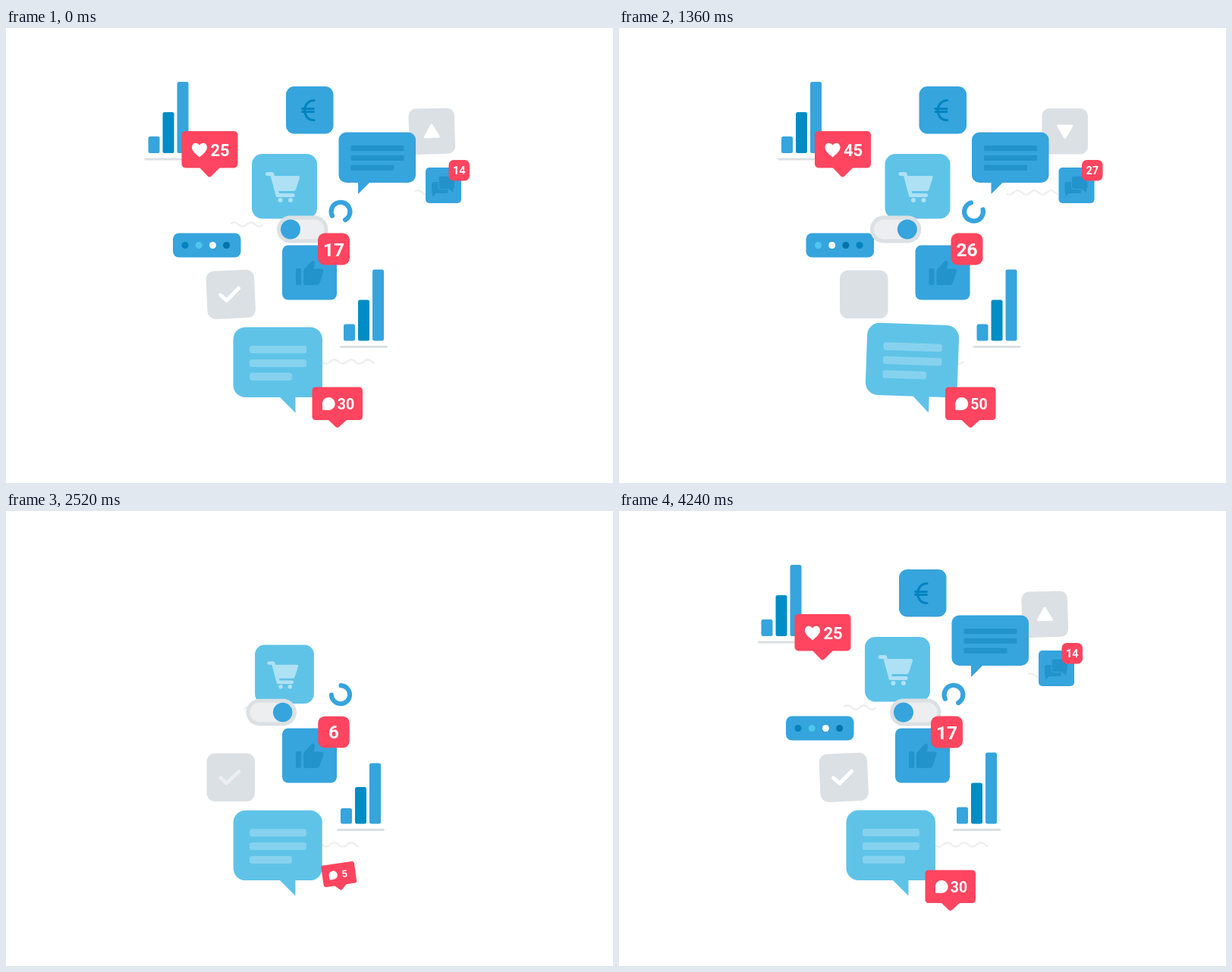
An HTML page with a canvas for the animation above (4.28 s loop, 800 by 600 pixels).

```html
<!DOCTYPE html>
<html>
<head>
<meta charset="utf-8">
<style>
html, body { margin: 0; width: 100%; height: 100%; overflow: hidden; background: #fff }
canvas { display: block }
</style>
</head>
<body>
<canvas id="stage" width="800" height="600"></canvas>
<script>
const c = document.getElementById('stage').getContext('2d');
const LOOP = 4280, BLUE = '#36a4dd', DARK = '#008cc4', ICON = '#2293cb', LIGHT = '#5fc3e8',
  RED = '#ff455f', GRAY = '#dbe0e4', WAVE = '#eeeff1', WHITE = '#fff';
const DOTS = [[0, 116, 173], [4, 131, 191], [79, 198, 236], [255, 255, 255]];

// Eased value through a few [time, value] points
function key(u, pts, linear) {
  if (u <= pts[0][0]) return pts[0][1];
  for (let i = 1; i < pts.length; i++) {
    const [t0, a] = pts[i - 1], [t1, b] = pts[i];
    if (u < t1) {
      const p = (u - t0) / (t1 - t0);
      return a + (b - a) * (linear ? p : (1 - Math.cos(Math.PI * p)) / 2);
    }
  }
  return pts[pts.length - 1][1];
}

// Exponential ease out, 0 before the start
function rise(u, start, dur = 800) {
  const p = (u - start) / dur;
  return p <= 0 ? 0 : p >= 1 ? 1 : 1 - 2 ** (-10 * p);
}

// Draws around (x, y) with a scale and a turn in degrees
function at(x, y, scale, turn, draw) {
  if (scale <= 0) return;
  c.save();
  c.translate(x, y);
  c.rotate(turn * Math.PI / 180);
  c.scale(scale, scale);
  c.translate(-x, -y);
  draw();
  c.restore();
}

// Brings a part in: grows from (x+dx, y+dy), turned, to its place
function pop(e, x, y, dx, dy, turn, draw) {
  c.save();
  c.translate(dx * (1 - e), dy * (1 - e));
  at(x, y, e, turn * (1 - e), draw);
  c.restore();
}

function box(x, y, w, h, r, color) {
  c.fillStyle = color;
  c.beginPath();
  c.roundRect(x, y, w, h, r);
  c.fill();
}
function disc(x, y, r, color) {
  c.fillStyle = color;
  c.beginPath();
  c.arc(x, y, r, 0, 7);
  c.fill();
}
function fill(d, color) {
  c.fillStyle = color;
  c.fill(new Path2D(d));
}
function line(d, color, width) {
  c.strokeStyle = color;
  c.lineWidth = width;
  c.lineCap = c.lineJoin = 'round';
  c.stroke(new Path2D(d));
}
function count(n, x, y, size) {
  c.fillStyle = WHITE;
  c.font = `700 ${size}px Roboto, sans-serif`;
  c.textAlign = 'center';
  c.fillText(Math.max(0, Math.floor(n)), x, y);
}

// Visible part of a fixed wavy line between a and b
function wave(a, b, y) {
  if (b - a < 2) return;
  let d = '';
  for (let x = a; x <= b; x++) d += (d ? 'L' : 'M') + x + ' ' + (y - 2.7 * Math.sin((x - 418) * Math.PI / 11 + 3.6));
  line(d, WAVE, 2.5);
}
const cycle = (u, start, period) => ((u - start) % period + period) % period * .22;

function waves(u) {
  if (u < 2150) return;
  const left = 365 - cycle(u, 2288, 1530);
  wave(Math.max(297, left), Math.min(365, left + 66), 259);
  const low = 351 + cycle(u, 2006, 1625);
  wave(Math.max(351, low - 67), Math.min(485, low), 440);
  if (u < 3150) return;
  const high = 367 + cycle(u, 3153, 1610);
  wave(Math.max(367, high - 66), Math.min(577, high), 217);
}

function bars(u, start, x, y, dx) {
  const e = rise(u, start, 1000);
  if (!e) return;
  x += dx * (1 - e);
  [22, 54, 94].forEach((h, i) => {
    h *= rise(u, start + 58 * i, 1000);
    if (h > 1) box(x + 19 * i, y - h, 15, h, 2.5, i == 1 ? DARK : BLUE);
  });
  const mid = x + 26.5, half = 30 * Math.min(1, e * 1.07);
  line(`M${mid - half} ${y + 8}H${mid + half}`, GRAY, 3);
}

function euro() {
  box(369, 77, 62.5, 62.5, 11, BLUE);
}
function euroSign() {
  line('M406 95.5Q400 95.5 396.500 100Q393.500 104 393.500 108.500T396.500 117.500Q400 121.500 406 121.500', '#0084c0', 3.2);
  line('M390.500 106.500H405.500M390.500 110.500H405.500', '#0084c0', 2.8);
}

function triangle(u) {
  const turn = key(u, [[3490, 180], [4290, 360], [4600, 360], [5400, 540]]);
  at(561.2, 136.2, rise(u, 2850, 700), turn, () => {
    box(531, 106, 60.5, 60.5, 10, GRAY);
    const d = 'M561.2 128L570.2 143.500H552.2Z';
    fill(d, WHITE);
    line(d, WHITE, 3);
  });
}

function talk(u) {
  const e = rise(u, 2525);
  pop(e, 465, 218, 0, 0, 10, () => {
    box(438.5, 137.5, 101.5, 66.5, 10, BLUE);
    fill('M464 202V219L480 203Z', BLUE);
    [70, 70, 57].forEach((w, i) => box(454.5, 155 + 12.8 * i, w * rise(u, 2640 + 60 * i), 7.2, 1.5, ICON));
  });
}

function chat(u) {
  pop(rise(u, 3050), 576.5, 207.5, -30, 30, 0, () => {
    box(553, 184, 47, 47, 5, BLUE);
    box(561, 203, 22, 15, 3, ICON);
    fill('M562 216V222.500L568 217Z', ICON);
    c.beginPath();
    c.roundRect(570.5, 195.5, 20.5, 16.5, 3);
    c.strokeStyle = BLUE;
    c.lineWidth = 2;
    c.stroke();
    box(570.5, 195.5, 20.5, 16.5, 3, ICON);
    fill('M582 211L589.500 217V210Z', ICON);
  });
  pop(rise(u, 3150), 597, 187.5, -25, 25, 0, () => {
    box(583.5, 174, 27.5, 27.5, 6.5, RED);
    count(6.8 + .0099 * (u - 3480), 597.2, 193, 14.5);
  });
}

function hearts(u) {
  pop(rise(u, 3020), 268, 160, 65, 80, 60, () => {
    box(231.5, 136, 74, 48.5, 5, RED);
    fill('M254 183L266 195.500Q268.300 197.500 270.500 195.500L283 183Z', RED);
    fill('M255 170.500C250 166 245 162.500 245 157.500C245 151 252 150 255 154.500C258 150 265 151 265 157.500C265 162.500 260 166 255 170.500Z', WHITE);
    count(14.2 + .0149 * (u - 3480), 282, 169, 22);
  });
}

function cart(u) {
  pop(rise(u, 2248), 367, 209, 0, 68, 0, () => {
    box(324, 166, 86, 85.5, 14, LIGHT);
    const tint = '#aee1f4';
    line('M344.500 192.500H350.500L358 220.500H378', tint, 5);
    fill('M352 195H385Q387.600 195 387 197.500L382 213Q381.300 215 379 215H357Z', tint);
    disc(361.5, 227, 3, tint);
    disc(375, 227, 3, tint);
  });
}

function ring(u) {
  const gap = key(u, [[1700, -83], [2520, 225], [3480, 592], [4240, 827], [5280, 1268], [5600, 1380], [5960, 1515]], true);
  at(441, 242.2, rise(u, 2100), gap, () => {
    c.beginPath();
    c.arc(441, 242.2, 12.4, .82, Math.PI * 2 - .82);
    c.strokeStyle = BLUE;
    c.lineWidth = 6.2;
    c.lineCap = 'round';
    c.stroke();
  });
}

function password(u) {
  const step = key(u, [[2720, -3], [3480, 0], [4240, 3], [5280, 5], [5600, 6], [5960, 7]], true);
  pop(rise(u, 2760), 264.7, 286.5, 60, 0, 0, () => {
    box(220, 270.5, 89.5, 32, 8, BLUE);
    for (let i = 0; i < 4; i++) {
      const p = ((i - step) % 4 + 4) % 4, n = Math.floor(p), next = DOTS[(n + 1) % 4];
      const mix = DOTS[n].map((v, k) => Math.round(v + (next[k] - v) * (p - n)));
      disc(236 + 18.2 * i, 286.5, 4.5, `rgb(${mix})`);
    }
  });
}

function toggle(u) {
  const x = key(u, [[2280, 296], [3380, 472.5], [3580, 472.5], [4680, 296], [5446, 296], [6546, 472.5]]);
  const on = key(u, [[2200, 0], [2380, 1], [3500, 1], [3650, 0], [5300, 0], [5450, 1]]);
  at(x + 34, 265.5, rise(u, 2100, 700), 0, () => {
    box(x, 247.5, 67.5, 36, 18, GRAY);
    box(x + 5, 252.5, 57.5, 26, 13, '#eceef0');
    disc(x + 18 + 31 * on, 265.5, 13, BLUE);
  });
}

function like(u) {
  const e = rise(u, 1638, 620);
  pop(e, 400, 322.5, -310, 66, 0, () => {
    box(364, 286.5, 72, 72, 8, BLUE);
    at(400, 322.5, 1, -20 * (1 - e), () => {
      box(382, 317, 7, 22, 2, ICON);
      fill('M392 337V321Q392 319 393.500 317.500L404 306.500Q407 307 407 310.500L405.400 317.500H415Q418.500 317.500 418.500 321L413.500 336Q412.500 339 409.500 339H395Q392 339 392 337Z', ICON);
    });
  });
  at(432, 291.5, rise(u, 2000), 0, () => {
    box(411, 270.5, 42, 42, 9, RED);
    count(6.1 + .0066 * (u - 2520), 432, 300.5, 24.5);
  });
}

function check(u) {
  const turn = key(u, [[3500, 0], [4240, -2.5], [5280, -1.5], [5450, 0]]);
  at(296.3, 351.2, rise(u, 1950, 600), turn, () => {
    box(264.5, 319.5, 63.5, 63.5, 11, GRAY);
    c.globalAlpha = key(u, [[2350, 0], [2520, .45], [2750, 1], [3150, 1], [3270, 0], [3350, 0], [3480, .7], [3700, 1], [5290, 1], [5450, 0]]);
    line('M282.500 351.500L290.500 359L307 343.500', WHITE, 5);
  });
}

function message(u) {
  const e = rise(u, 1686, 1000);
  const turn = key(u, [[3000, 0], [3480, -9], [4240, 0], [5280, 1], [5600, 2]], u > 4240);
  const size = key(u, [[3000, 1], [3480, .87], [4240, 1], [5280, 1.015], [5600, 1.03]], u > 4240);
  c.save();
  c.translate(-42 * (1 - e), 0);
  at(381.5, 507, e * size, turn, () => {
    box(299.5, 394.5, 117.5, 92.5, 16, LIGHT);
    fill('M360 486L381.500 507.500V485Z', LIGHT);
    [75, 75, 56].forEach((w, i) => box(321, 419 + 17.9 * i, w * rise(u, 1700 + 15 * i), 10, 3, '#86d2ee'));
  });
  c.restore();
}

function replies(u) {
  pop(rise(u, 2395), 437, 500, 7, -53, -24, () => {
    box(403.5, 473.5, 66.5, 43.5, 4.5, RED);
    fill('M424 516L434.500 526Q436.700 528 439 526L450 516Z', RED);
    disc(425.2, 495.5, 8.5, WHITE);
    fill('M417 495V503.800H425Z', WHITE);
    count(5.2 + .0148 * (u - 2520), 448, 502.5, 19.5);
  });
}

function scene(u, shift) {
  c.save();
  c.translate(shift, 0);
  waves(u);
  bars(u, 2930, 187.5, 165, 24);
  hearts(u);
  const e = rise(u, 3130);
  pop(e, 400.2, 108.2, -27, 100, 0, () => {
    euro();
    at(400, 108.2, 1, -150 * (1 - e), euroSign);
  });
  triangle(u);
  talk(u);
  chat(u);
  cart(u);
  ring(u);
  password(u);
  toggle(u);
  like(u);
  check(u);
  bars(u, 2130, 445, 412.5, -60);
  message(u);
  replies(u);
  c.restore();
}

const began = performance.now();
function frame() {
  const t = Math.floor((performance.now() - began) % LOOP / 40) * 40;
  c.clearRect(0, 0, 800, 600);
  if (t < 1704) scene(t + LOOP - 40, t < 1004 ? 0 : 800 * 2 ** (10 * ((t - 1004) / 700 - 1)));
  if (t > 1638) scene(t, 0);
  requestAnimationFrame(frame);
}
frame();
</script>
</body>
</html>
```
